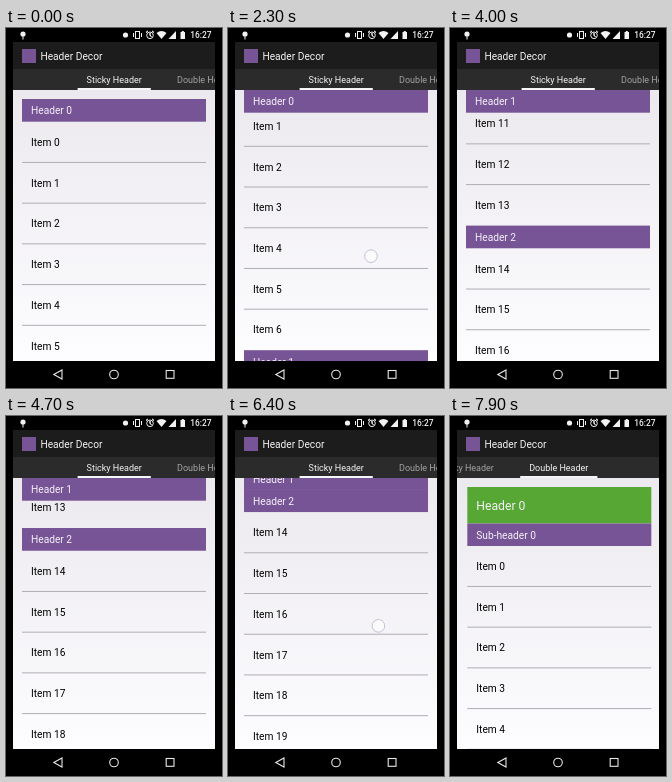
An HTML page with a canvas that plays this animation: 216 px wide and 360 px high, repeating every 8 s.

```html
<!DOCTYPE html>
<html lang="en">
<head>
<meta charset="utf-8">
<title>Sticky list headers</title>
<style>
html, body { margin: 0; width: 100%; height: 100%; overflow: hidden; background: #000; }
canvas { display: block; width: 216px; height: 360px; }
</style>
</head>
<body>
<canvas id="stage"></canvas>
<script>
const W = 216, H = 360, LOOP = 8000;
const PURPLE = '#775496', GREEN = '#56a733';
const LEFT = 7, WIDTH = 202, TOP = 62, BOTTOM = 333, PAD = 9;
const ROW = 40.72, HEAD = 22.7, GROUP = 7;

const canvas = document.getElementById('stage');
const ctx = canvas.getContext('2d');
const dpr = window.devicePixelRatio || 1;
canvas.width = W * dpr;
canvas.height = H * dpr;

// Smooth monotone curve through [time, value] points
function track(points) {
  const slope = i => (points[i + 1][1] - points[i][1]) / (points[i + 1][0] - points[i][0]);
  const last = points.length - 1;
  const tangent = points.map((_, i) => {
    if (i === 0 || i === last) return 0;
    const a = slope(i - 1), b = slope(i);
    return a * b <= 0 ? 0 : 2 * a * b / (a + b);
  });
  return t => {
    if (t <= points[0][0]) return points[0][1];
    if (t >= points[last][0]) return points[last][1];
    let i = 0;
    while (t > points[i + 1][0]) i++;
    const [t0, v0] = points[i], [t1, v1] = points[i + 1];
    const d = t1 - t0, u = (t - t0) / d, w = 1 - u;
    return w * w * ((1 + 2 * u) * v0 + u * d * tangent[i]) +
           u * u * ((3 - 2 * u) * v1 - w * d * tangent[i + 1]);
  };
}

const scrollAt = track([[1750, 0], [2300, 56.7], [2600, 132], [3100, 285], [3700, 425],
  [4300, 540], [4700, 575], [5100, 594], [5400, 615.4], [5700, 622], [6100, 604],
  [6400, 613.7], [6750, 618], [7150, 613.5]]);
const pageAt = track([[7150, 0], [7300, .12], [7500, .5], [7700, .9], [7900, .9935]]);
const firstX = track([[1750, 132], [2300, 143], [2600, 147]]);
const firstGrip = track([[1750, 299], [2100, 285]]);
const secondGrip = track([[5400, 817.6], [6400, 823.6]]);

function rect(x, y, w, h, color) {
  ctx.fillStyle = color;
  ctx.fillRect(x, y, w, h);
}

function text(str, x, mid, size, color, align = 'left', weight = 400) {
  ctx.font = `${weight} ${size}px Roboto, sans-serif`;
  ctx.textAlign = align;
  ctx.fillStyle = color;
  ctx.fillText(str, x, mid + size * .355);
}

function shape(points, fill) {
  ctx.beginPath();
  points.forEach(([x, y]) => ctx.lineTo(x, y));
  ctx.closePath();
  if (fill) ctx.fill(); else ctx.stroke();
}

function disc(x, y, r, fill) {
  ctx.beginPath();
  ctx.arc(x, y, r, 0, Math.PI * 2);
  if (fill) ctx.fill(); else ctx.stroke();
}

function clipTo(y, h) {
  ctx.save();
  ctx.beginPath();
  ctx.rect(LEFT, y, WIDTH, h);
  ctx.clip();
}

function statusBar() {
  ctx.fillStyle = ctx.strokeStyle = '#f2f2f2';
  ctx.lineWidth = 1;
  // plug
  disc(17, 6, 2.6, true);
  ctx.fillRect(16.5, 8, 1, 3.5);
  disc(119.5, 7, 2.6, true);
  // vibrate
  ctx.strokeRect(129.5, 3.5, 4, 7);
  ctx.fillRect(127, 5, 1, 4);
  ctx.fillRect(135, 5, 1, 4);
  // alarm
  disc(144, 7.3, 3.3);
  shape([[144, 5], [144, 7.5], [145.5, 8.5], [144, 7.5]]);
  shape([[140, 4.5], [141.8, 3]]);
  shape([[146.2, 3], [148, 4.5]]);
  // wifi, signal, battery
  shape([[150.5, 5], [153, 3.5], [155.5, 3], [158, 3.5], [160.5, 5], [155.5, 11]], true);
  shape([[162.5, 11], [170, 11], [170, 3]], true);
  ctx.fillRect(174.5, 4, 4.5, 7);
  ctx.fillRect(175.8, 3, 2, 1);
  text('16:27', 184.3, 7.2, 8.4, '#f2f2f2', 'left', 500);
}

function navBar() {
  rect(0, BOTTOM, W, H - BOTTOM, '#000');
  ctx.strokeStyle = '#e8e8e8';
  ctx.lineWidth = 1.1;
  shape([[47.8, 346.5], [56, 342], [56, 351]]);
  disc(108, 346.5, 4.3);
  ctx.strokeRect(160.2, 342.5, 7.8, 7.8);
}

function tabs(page) {
  clipTo(41, TOP - 41);
  rect(LEFT, 41, WIDTH, TOP - 41, '#2b2b2b');
  const current = Math.round(page);
  ['Sticky Header', 'Double Header'].forEach((name, i) => {
    const x = 108.2 + 92.5 * (i - page);
    text(name, x, 52, 9, i === current ? '#f4f4f4' : '#a2a2a2', 'center');
    if (i !== current) return;
    const half = ctx.measureText(name).width / 2 + 9;
    ctx.globalAlpha = Math.abs(page - .5) * 2;
    rect(x - half, 60, half * 2, 2, '#f6f6f6');
    ctx.globalAlpha = 1;
  });
  ctx.restore();
}

function bar(label, y, h = HEAD, color = PURPLE, size = 10.2) {
  rect(16, y, 184, h, color);
  text(label, 25, y + h / 2 + .5, size, '#f5f1f8');
}

function item(n, y, divider) {
  if (y > BOTTOM || y + ROW < TOP) return;
  text('Item ' + n, 25, y + 20.4, 10.2, '#000');
  if (divider) rect(16, y + ROW - .8, 184, 1, '#b0adb4');
}

function stickyList(scroll) {
  const span = 23 + GROUP * ROW;
  const start = g => TOP + PAD + g * span - scroll;
  for (let g = 0; g < 4; g++) {
    for (let i = 0; i < GROUP; i++) {
      item(g * GROUP + i, start(g) + 23 + i * ROW, i < GROUP - 1);
    }
  }
  // The next header pushes the stuck one out, overlapping a little to hide the seam
  for (let g = 0; g < 4; g++) {
    const y = Math.min(Math.max(start(g), TOP), start(g + 1) - HEAD + .5);
    if (y < BOTTOM && y > TOP - HEAD) bar('Header ' + g, y);
  }
}

function doubleList() {
  bar('Header 0', 71, 36.5, GREEN, 12.2);
  bar('Sub-header 0', 107.5, 22.5);
  for (let i = 0; i < 5; i++) item(i, 130 + i * ROW, true);
}

function touch(t, scroll, page) {
  let x, y;
  if (t >= 1000 && t < 2650) {
    x = firstX(t);
    y = firstGrip(t) - scroll;
  } else if (t >= 4950 && t < 7500) {
    x = 151.4 - Math.min(1, Math.max(0, (t - 5400) / 1000)) - WIDTH * page;
    y = secondGrip(t) - scroll;
  } else return;
  ctx.fillStyle = 'rgba(255,255,255,.55)';
  ctx.strokeStyle = '#c6c0da';
  ctx.lineWidth = 1;
  disc(x, y, 6.3, true);
  disc(x, y, 6.3);
}

function draw(t) {
  const scroll = scrollAt(t), page = pageAt(t);
  ctx.setTransform(dpr, 0, 0, dpr, 0, 0);
  rect(0, 0, W, H, '#000');
  statusBar();
  rect(LEFT, 14, WIDTH, 27, '#1c1c1c');
  rect(16, 21, 14, 14, PURPLE);
  text('Header Decor', 34.4, 28.2, 10.2, '#f4f4f4');
  tabs(page);

  const back = ctx.createLinearGradient(0, TOP, 0, BOTTOM);
  back.addColorStop(0, '#ebe9ed');
  back.addColorStop(1, '#fdfcff');
  clipTo(TOP, BOTTOM - TOP);
  rect(LEFT, TOP, WIDTH, BOTTOM - TOP, back);
  ctx.translate(-WIDTH * page, 0);
  if (page < .99) stickyList(scroll);
  ctx.translate(WIDTH, 0);
  if (page > 0) doubleList();
  ctx.restore();

  touch(t, scroll, page);
  navBar();
}

const begin = performance.now();
function tick() {
  draw((performance.now() - begin) % LOOP);
  requestAnimationFrame(tick);
}
tick();
</script>
</body>
</html>
```
